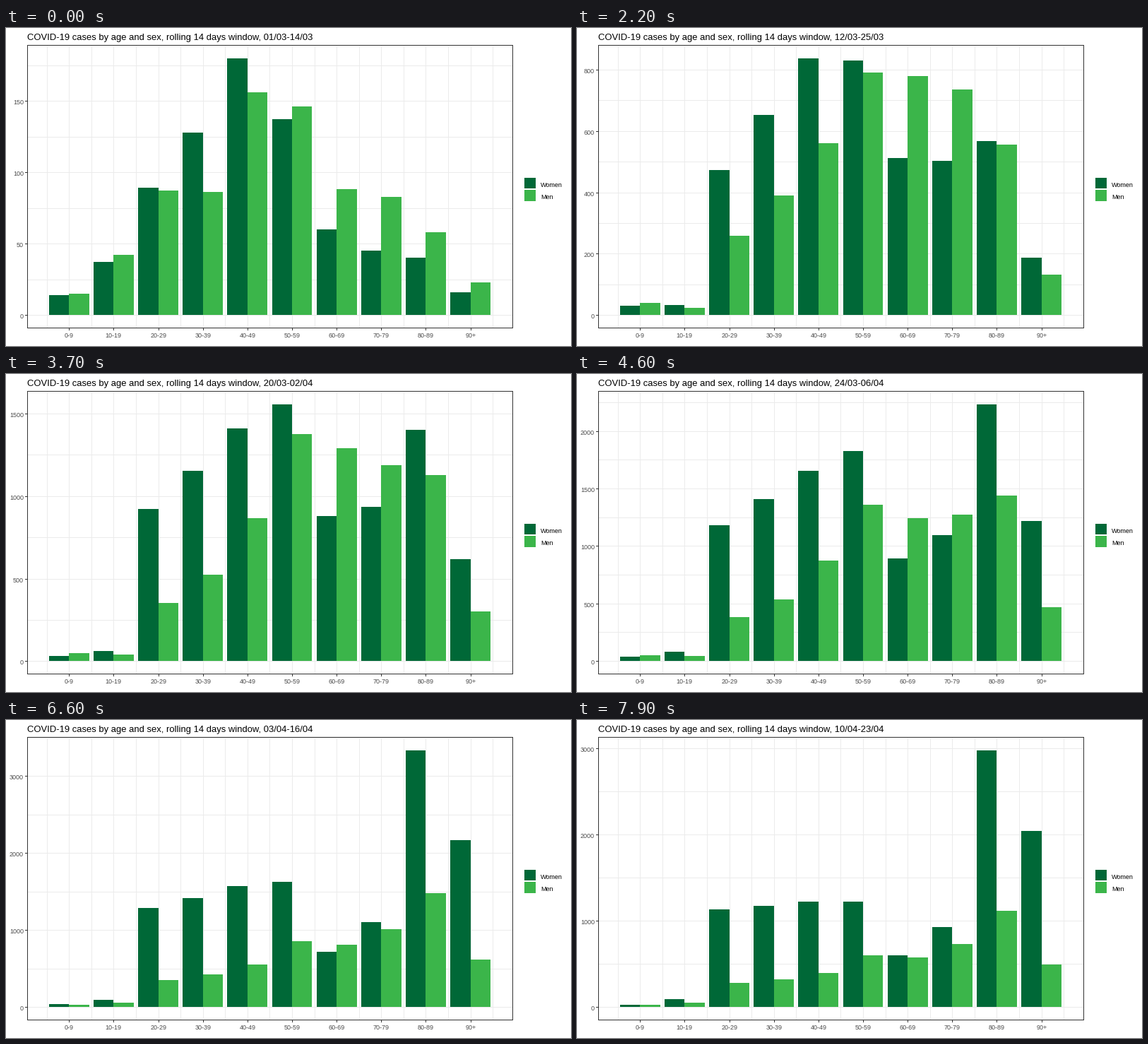
A matplotlib script for the animation above (8000 ms loop, 800x450 px).

```python
import math
import numpy as np
import matplotlib.pyplot as plt
from matplotlib.animation import FuncAnimation
from matplotlib.patches import Rectangle

plt.rcParams["font.family"] = "Liberation Sans"

FRAMES, INTERVAL = 80, 100
LEFT, RIGHT, TOP, BOTTOM = 30, 717, 24, 424     # panel border pixels
ZERO, SPAN = 406.2, 363.6                       # baseline, height of tallest bar
X0, STEP = 89.3, 63.15                          # first group centre, spacing
WOMEN, MEN = "#006837", "#3BB54A"
GRID, DARK, GREY = "#EBEBEB", "#333333", "#4D4D4D"
AGES = [f"{a}-{a + 9}" for a in range(0, 90, 10)] + ["90+"]

# Cases per age group on a few key days
DAYS = np.array([0, 5.5, 11, 18.5, 27, 33, 39.5])
CASES_W = np.array([
    [14, 37, 89, 128, 180, 137, 60, 45, 40, 16],
    [24, 27, 199, 314, 435, 382, 208, 212, 219, 87],
    [31, 33, 474, 653, 838, 831, 513, 503, 568, 187],
    [30, 61, 922, 1154, 1411, 1558, 880, 935, 1402, 617],
    [45, 92, 1330, 1530, 1746, 1897, 836, 1156, 2907, 1752],
    [42, 95, 1288, 1416, 1570, 1625, 720, 1102, 3335, 2167],
    [28, 92, 1135, 1174, 1224, 1224, 600, 930, 2980, 2045]], float)
CASES_M = np.array([
    [15, 42, 87, 86, 156, 146, 88, 83, 58, 23],
    [23, 28, 158, 220, 316, 356, 333, 319, 218, 63],
    [40, 24, 259, 391, 561, 790, 780, 736, 556, 132],
    [48, 40, 353, 523, 867, 1377, 1290, 1188, 1129, 301],
    [44, 52, 388, 508, 796, 1194, 1080, 1235, 1602, 588],
    [30, 60, 352, 427, 555, 856, 811, 1012, 1480, 617],
    [30, 54, 282, 325, 398, 602, 578, 733, 1117, 496]], float)
SLOPE_W = np.gradient(CASES_W, DAYS, axis=0, edge_order=2)
SLOPE_M = np.gradient(CASES_M, DAYS, axis=0, edge_order=2)


def cubic(vals, slopes, day):
    """Hermite interpolation between key days."""
    i = min(max(np.searchsorted(DAYS, day) - 1, 0), len(DAYS) - 2)
    h = DAYS[i + 1] - DAYS[i]
    u = (day - DAYS[i]) / h
    return ((1 + 2 * u) * (1 - u) ** 2 * vals[i] + u * (1 - u) ** 2 * h * slopes[i]
            + u * u * (3 - 2 * u) * vals[i + 1] + u * u * (u - 1) * h * slopes[i + 1])


def tick_step(lo, hi, want=5):
    """Extended Wilkinson search: the tick spacing with the best score."""
    nice = [1, 5, 2, 2.5, 4, 3]
    best, found = -9, None
    for i, q in enumerate(nice):
        for k in range(2, 11):
            z = math.ceil(math.log10((hi - lo) / (k + 1) / q))
            for step in (q * 10.0 ** z, q * 10.0 ** (z + 1)):
                first = math.floor(hi / step) - (k - 1)
                for start in range(first, math.ceil(lo / step) + 1):
                    a, b = start * step, (start + k - 1) * step
                    simple = 1 - i / 5 - 1 + (a <= 0 <= b)
                    cover = 1 - 0.5 * ((hi - b) ** 2 + (lo - a) ** 2) / (0.1 * (hi - lo)) ** 2
                    r = (k - 1) / (b - a)
                    rt = (want - 1) / (max(b, hi) - min(a, lo))
                    dense = 2 - max(r / rt, rt / r)
                    score = 0.25 * simple + 0.2 * cover + 0.5 * dense
                    if score > best:
                        best, found = score, step
    return found


def date(n):
    """Days after 1 March as dd/mm."""
    return f"{n + 1:02d}/03" if n < 31 else f"{n - 30:02d}/04"


fig = plt.figure(figsize=(8, 4.5), dpi=100, facecolor="white")
ax = fig.add_axes([0, 0, 1, 1])
ax.set(xlim=(0, 800), ylim=(450, 0))
ax.axis("off")


def box(x0, y0, x1, y1, color, z=1):
    return ax.add_patch(Rectangle((x0, y0), x1 - x0, y1 - y0, fc=color, ec="none",
                                  lw=0, antialiased=False, zorder=z))


def label(x, y, s, px=9, color="black", ha="left"):
    return ax.text(x, y, s, fontsize=px * 0.72, color=color, ha=ha, va="baseline")


# Fixed parts
for i in range(21):
    x = round(X0 + (i - 1) * STEP / 2)
    box(x, TOP, x + 1, BOTTOM, GRID)
for i, age in enumerate(AGES):
    x = round(X0 + i * STEP)
    box(x, BOTTOM, x + 1, BOTTOM + 4, DARK, 3)
    label(x, 438, age, color=GREY, ha="center")
box(LEFT, TOP, RIGHT + 1, TOP + 1, DARK, 4)
box(LEFT, BOTTOM, RIGHT + 1, BOTTOM + 1, DARK, 4)
box(LEFT, TOP, LEFT + 1, BOTTOM + 1, DARK, 4)
box(RIGHT, TOP, RIGHT + 1, BOTTOM + 1, DARK, 4)
box(734, 212, 750, 227, WOMEN)
box(734, 229, 750, 245, MEN)
label(757, 225, "Women")
label(757, 242, "Men")

title = label(30, 17, "", 13)
bars = []
for i in range(10):
    c = X0 + i * STEP
    l, m, r = (round(c + d * STEP) for d in (-0.45, 0, 0.45))
    bars.append((box(l, 0, m, 1, WOMEN, 2), box(m, 0, r, 1, MEN, 2)))
moving = []


def draw(k):
    while moving:
        moving.pop().remove()

    day = k / 2
    women, men = cubic(CASES_W, SLOPE_W, day), cubic(CASES_M, SLOPE_M, day)
    peak = max(women.max(), men.max())
    scale = SPAN / peak
    for pair, values in zip(bars, zip(women, men)):
        for bar, v in zip(pair, values):
            y = round(ZERO - v * scale)
            bar.set_y(y)
            bar.set_height(round(ZERO) - y)

    step = tick_step(-0.05 * peak, 1.05 * peak)
    for n in range(int(1.05 * peak / step * 2) + 1):
        v = n * step / 2
        y = round(ZERO - v * scale)
        moving.append(box(LEFT, y, RIGHT, y + 1, GRID))
        if n % 2 == 0:
            moving.append(box(LEFT - 3, y, LEFT, y + 1, DARK, 3))
            moving.append(label(25, y + 5, f"{v:g}", color=GREY, ha="right"))

    n = (k + 1) // 2
    title.set_text("COVID-19 cases by age and sex, rolling 14 days window, "
                   f"{date(n)}-{date(n + 13)}")
    return []


anim = FuncAnimation(fig, draw, frames=FRAMES, interval=INTERVAL,
                     repeat=True, repeat_delay=0, blit=False)
plt.show()
```
